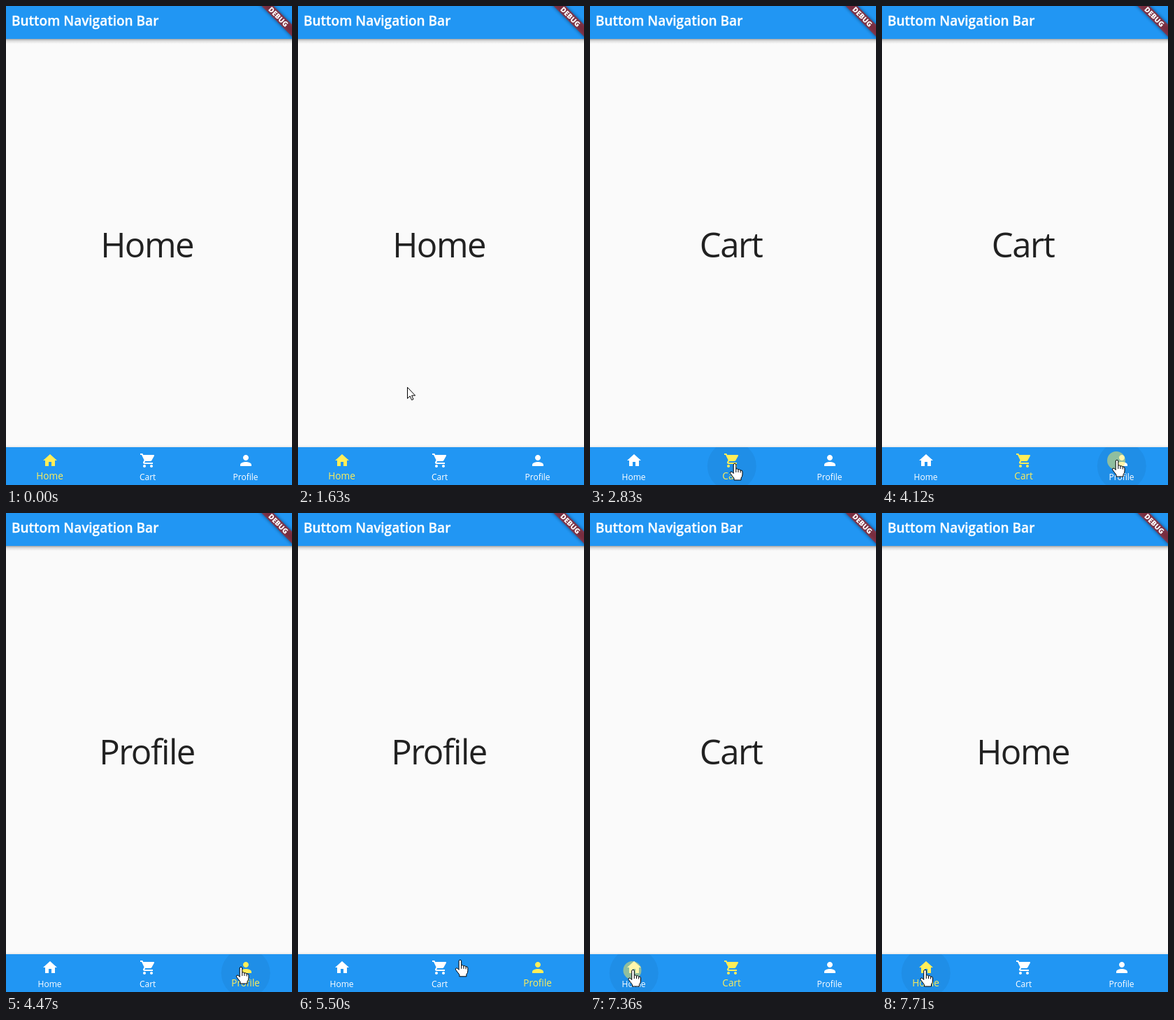
These frames come from a looping animation (409 by 684 pixels, 8 s). An HTML page:

```html
<!DOCTYPE html>
<html lang="en">
<head>
<meta charset="utf-8">
<title>Bottom navigation</title>
<style>
  html, body { margin: 0; width: 100%; height: 100%; overflow: hidden; background: #fafafa; }
  svg { display: block; width: 100%; height: 100%; }
  text { font-family: "Open Sans", "Noto Sans", sans-serif; }
  .mid { text-anchor: middle; }
</style>
</head>
<body>
<svg viewBox="0 0 409 684">
  <defs>
    <linearGradient id="drop" x2="0" y2="1">
      <stop stop-opacity=".34"/>
      <stop offset=".4" stop-opacity=".12"/>
      <stop offset="1" stop-opacity="0"/>
    </linearGradient>
    <linearGradient id="rise" x2="0" y2="1">
      <stop stop-opacity="0"/>
      <stop offset="1" stop-opacity=".07"/>
    </linearGradient>
    <filter id="soft" x="-20%" y="-60%" width="140%" height="220%"><feGaussianBlur stdDeviation="2.5"/></filter>
    <clipPath id="barClip"><rect y="630" width="409" height="54"/></clipPath>
  </defs>
  <rect width="409" height="684" fill="#fafafa"/>
  <rect y="47" width="409" height="7" fill="url(#drop)"/>
  <rect width="409" height="47" fill="#2196f3"/>
  <text x="8" y="28" font-size="19" font-weight="600" fill="#fff" stroke="#fff" stroke-width=".3">Buttom Navigation Bar</text>
  <g transform="translate(389.5 15.5) rotate(45)">
    <rect x="-50" y="-6" width="100" height="12" opacity=".5" filter="url(#soft)"/>
    <rect x="-50" y="-6" width="100" height="12" fill="#b71c1c" fill-opacity=".627"/>
    <text class="mid" y="3.6" font-size="10.2" font-weight="800" fill="#fff">DEBUG</text>
  </g>
  <text id="page" class="mid" x="201.6" y="359.3" font-size="49" letter-spacing="-1.5" fill="#212121"></text>
  <rect y="627" width="409" height="3" fill="url(#rise)"/>
  <rect y="630" width="409" height="54" fill="#2196f3"/>
  <g clip-path="url(#barClip)"><circle id="glow" cy="657" r="35"/></g>
  <g id="tabs"></g>
  <g clip-path="url(#barClip)"><circle id="splash" fill="#ffee58"/></g>
  <g id="cursor" stroke="#000" stroke-width="1" stroke-linejoin="round" fill="#fff">
    <path id="arrow" d="M.5 .5V16.5L4.2 13 6.6 18.6 9 17.6 6.6 12.2H11.6Z"/>
    <g id="hand">
      <path d="M-1.8 2Q-1.8 .4 0 .4T1.8 2V8.2Q3.6 7 5 9Q7 8 8.2 10Q11 9.5 11 12V16Q11 19 9 21V24H-1V21.5L-6.3 14.5Q-7.3 12.3-5 12Q-3.5 12-1.8 14.5Z"/>
      <path d="M1.8 8.2V13M5 9V13M8.2 10V13.5" fill="none"/>
    </g>
  </g>
</svg>
<script>
const LOOP = 8000, STEP = 70, GROW = 350, SWITCH = 140;
const $ = id => document.getElementById(id);
const set = (el, attrs) => { for (const k in attrs) el.setAttribute(k, attrs[k]); };
const clamp = v => Math.min(1, Math.max(0, v));
const mix = (a, b, k) => a + (b - a) * k;

const tabs = [
  { name: "Home", x: 62.8, icon: "M10 20v-6h4v6h5v-8h3L12 3 2 12h3v8z" },
  { name: "Cart", x: 202.8, icon: "M7 18c-1.1 0-1.99.9-1.99 2S5.9 22 7 22s2-.9 2-2-.9-2-2-2zM1 2v2h2l3.6 7.59-1.35 2.45c-.16.28-.25.61-.25.96 0 1.1.9 2 2 2h12v-2H7.42c-.14 0-.25-.11-.25-.25l.03-.12.9-1.63h7.45c.75 0 1.41-.41 1.75-1.03l3.58-6.49c.08-.14.12-.31.12-.48 0-.55-.45-1-1-1H5.21l-.94-2H1zm16 16c-1.1 0-1.99.9-1.99 2s.89 2 1.99 2 2-.9 2-2-.9-2-2-2z" },
  { name: "Profile", x: 342.8, icon: "M12 12c2.21 0 4-1.79 4-4s-1.79-4-4-4-4 1.79-4 4 1.79 4 4 4zm0 2c-2.67 0-8 1.34-8 4v2h16v-2c0-2.66-5.33-4-8-4z" }
];
for (const tab of tabs) {
  const make = (tag, attrs) => {
    const el = document.createElementNS("http://www.w3.org/2000/svg", tag);
    set(el, attrs);
    return $("tabs").appendChild(el);
  };
  tab.path = make("path", { d: tab.icon, transform: `translate(${tab.x - 11.8} 637)` });
  tab.label = make("text", { class: "mid", x: tab.x - .2, "font-weight": 500 });
  tab.label.textContent = tab.name;
}

// Taps: when, which tab, when its highlight fades
const taps = [
  { at: 2480, tab: 1, end: 3440 },
  { at: 4120, tab: 2, end: 5000 },
  { at: 5840, tab: 1, end: 6210 },
  { at: 7360, tab: 0, end: LOOP }
];

// Pointer tip: time, x, y
const track = [
  [529, -30, 618], [530, 1, 618], [840, 140, 640], [1020, 243, 655], [1160, 250, 700],
  [1489, 110, 700], [1490, 112, 642], [1630, 156, 544], [1770, 178, 582], [2030, 199, 638], [2260, 207, 653],
  [3370, 207, 653], [3580, 285, 640], [3720, 336, 648],
  [4930, 336, 648], [5280, 268, 631], [5710, 194, 645],
  [6140, 194, 645], [6400, 135, 656], [6600, 83, 654], [6810, 61.5, 652], [LOOP, 61.5, 652]
];

// Motion advances in even steps from the start of each burst
const bursts = [530, 1490, 2480, 3440, 4120, 5000, 5840, 6670, 7360];
function stepped(t) {
  const start = bursts.filter(b => b <= t).pop() || 0;
  return start + Math.floor((t - start) / STEP) * STEP;
}

function pointer(t) {
  const i = track.findIndex(k => k[0] > t);
  if (i < 1) return [-30, 618];
  const [a, b] = [track[i - 1], track[i]];
  const k = (t - a[0]) / (b[0] - a[0]);
  return [mix(a[1], b[1], k), mix(a[2], b[2], k)];
}

function draw(now) {
  const t = stepped(now);
  const n = taps.filter(tap => tap.at <= t).length;
  const tap = taps[n - 1];
  const before = n > 1 ? taps[n - 2].tab : 0;
  const current = tap ? tap.tab : 0;
  const age = tap ? t - tap.at : LOOP;
  const k = clamp((age - SWITCH) / (GROW - SWITCH));

  $("page").textContent = tabs[age >= SWITCH ? current : before].name;
  tabs.forEach((tab, i) => {
    const on = i === current ? k : i === before ? 1 - k : 0;
    const fill = `rgb(255,${mix(255, 238, on)},${mix(255, 88, on)})`;
    set(tab.path, { fill });
    set(tab.label, { fill, "font-size": mix(12, 13.6, on), y: mix(677, 676, on) });
  });

  const p = clamp(age / GROW);
  const home = tabs[current].x;
  const tip = tap ? pointer(tap.at) : [0, 0];
  set($("glow"), { cx: home, opacity: tap ? .05 * (1 - clamp((t - tap.end) / 200)) : 0 });
  set($("splash"), {
    cx: mix(tip[0] - 1, home, p), cy: mix(tip[1] + 1, 657, p),
    r: mix(13, 35, clamp(p * 1.3)), opacity: .5 * (1 - p) ** 1.6
  });

  const [x, y] = pointer(t);
  const hot = y >= 630;
  set($("cursor"), { transform: `translate(${x} ${y})` });
  set($("hand"), { visibility: hot ? "visible" : "hidden" });
  set($("arrow"), { visibility: hot ? "hidden" : "visible" });
}

function tick() {
  draw(performance.now() % LOOP);
  requestAnimationFrame(tick);
}
tick();
</script>
</body>
</html>
```
